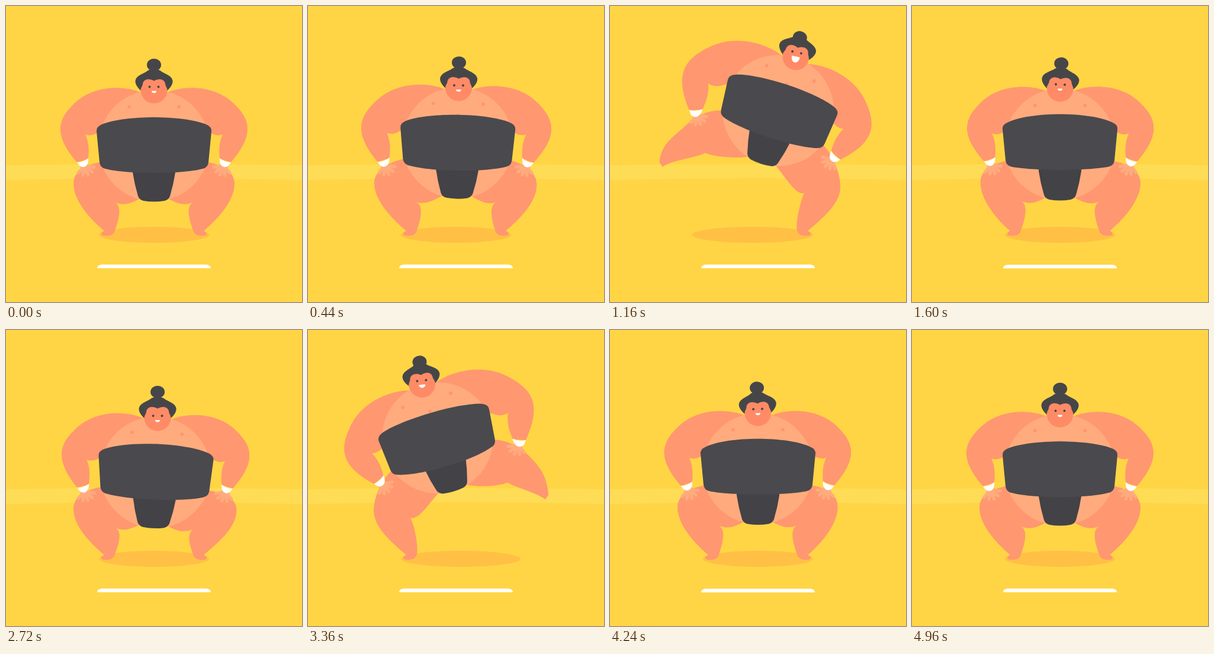
Write an HTML page with a canvas that moves like this. It is 500x500 px and loops after 5 s.

```html
<!DOCTYPE html>
<html lang="en">
<head>
<meta charset="utf-8">
<title>Sumo stomp</title>
<style>
html, body { margin: 0; width: 100%; height: 100%; overflow: hidden; background: #ffd545; }
canvas { display: block; width: 500px; height: 500px; }
</style>
</head>
<body>
<canvas id="stage" width="500" height="500"></canvas>
<script>
const ctx = document.getElementById('stage').getContext('2d');
const SKIN = '#ff9770', BELLY = '#ffab7d', FACE = '#ff8b66';
const BELT = '#4a494d', CLOTH = '#434246', HAIR = '#464649';
const LOOP = 5000, HALF = 2600, STEP = 40, LANDING = 1260;

const ramp = (t, from, to) => Math.min(1, Math.max(0, (t - from) / (to - from)));
const smooth = (t, from, to) => {
  const u = ramp(t, from, to);
  return u * u * (3 - 2 * u);
};
// Damped swing that starts when the foot hits the ground.
const wobble = (t, period, decay) => {
  const age = Math.max(0, t - LANDING);
  return Math.exp(-age / decay) * Math.sin(2 * Math.PI * age / period);
};

// All motion follows from a crouch, a lean, a foot lift, a grin and a sway.
function pose(t) {
  const drop = 1 - ramp(t, 1080, LANDING) ** 2;
  const dip = smooth(t, 0, 240) - smooth(t, 240, 560);
  const squat = dip + 2 * wobble(t, 480, 160);
  const lean = smooth(t, 300, 1000) * drop;
  const lift = (1 - (1 - ramp(t, 560, 1000)) ** 2) * drop;
  const grin = smooth(t, 300, 1200) - smooth(t, LANDING, 1460);
  const sway = wobble(t, 480, 260);
  return { dip, squat, lean, lift, grin, sway, kick: 23 * wobble(t, 320, 80) };
}

const rad = deg => deg * Math.PI / 180;
function turn(x, y, a) {
  const c = Math.cos(a), s = Math.sin(a);
  return [x * c - y * s, x * s + y * c];
}
function shape(path, color) {
  ctx.fillStyle = color;
  ctx.fill(new Path2D(path));
}
function oval(x, y, rx, ry, color, end = 2 * Math.PI) {
  ctx.fillStyle = color;
  ctx.beginPath();
  ctx.ellipse(x, y, rx, ry, 0, 0, end);
  ctx.fill();
}
function group(draw) {
  ctx.save();
  draw();
  ctx.restore();
}
function flip() {
  ctx.translate(500, 0);
  ctx.scale(-1, 1);
}
function onBody(body, x, y) {
  const [px, py] = turn(x, y, body.a);
  return [body.x + px, body.y + py];
}

// Knee, inner knee and ankle are points; straight and twist run from 0 to 1.
function leg(body, { knee: [kx, ky], inner: [ix, iy], ankle: [ax, ay], straight, twist }) {
  const hip = (x, y) => onBody(body, x, y);
  const foot = (x, y) => {
    const [px, py] = turn(x, y, rad(56 * twist));
    return [ax + px, ay + py];
  };
  const [bx, by] = turn(0, 28, rad(45 * twist));
  const q = 1 - twist, w = 10 + 8 * q;
  shape(`M${hip(0, 50)} L${hip(-70, 26)}
    C${hip(-98, 26)} ${kx - bx} ${ky - by} ${kx} ${ky}
    C${kx + bx} ${ky + by} ${foot(-26, -22)} ${ax} ${ay}
    C${foot(-6 * q, 2 * q)} ${foot(-7 * q, 8 * q)} ${foot(0, 8 * q)}
    C${foot(10, 9 * q)} ${foot(w - 2, 6 * q)} ${foot(w, -q)}
    C${foot(w + 6 - 8 * straight, -q - 17)} ${ix + 16 - 29 * straight} ${iy + 5 + 3 * straight} ${ix} ${iy}
    C${ix + 14} ${iy + 6} ${hip(-43, 100)} ${hip(-25, 90)}Z`, SKIN);
}

function arm(body, dx, dy, handTurn) {
  const [sx, sy] = onBody(body, -22, -91);
  const wx = 130 + dx, wy = 264 + dy;
  const rest = Math.atan2(119, -98), angle = Math.atan2(wy - sy, wx - sx);
  const stretch = Math.hypot(wx - sx, wy - sy) / Math.hypot(98, 119);

  group(() => {
    ctx.translate(wx, wy);
    ctx.rotate((angle - rest) * handTurn);
    ctx.strokeStyle = BELLY;
    ctx.lineCap = 'round';
    ctx.lineWidth = 5.5;
    ctx.beginPath();
    for (let i = 0; i < 5; i++) {
      const [x, y] = turn(16, 0, rad(132 - 31 * i));
      ctx.moveTo(3, 6);
      ctx.lineTo(3 + x, 6 + y);
    }
    ctx.stroke();
    oval(3, 8, 8, 6, BELLY);
  });
  group(() => {
    ctx.translate(sx, sy);
    ctx.rotate(angle);
    ctx.scale(stretch, Math.sqrt(stretch));
    ctx.rotate(-rest);
    ctx.translate(-228, -145);
    shape(`M228 146C200 134 145 132 112 168C86 194 82 220 120 264L139 258
      C141 240 139 228 134 217C142 220 150 218 158 212L200 200L235 160Z`, SKIN);
    shape('M120 264Q131 264 139 257C140 266 136 272 130 272C125 272 122 267 120 264Z', '#fff');
  });
}

function torso(pitch) {
  oval(0, 0, 94, 94, BELLY);
  for (const x of [-42, 42]) oval(x, -66, 3, 3, SKIN);
  oval(0, -46.5, 3, 3, SKIN);
  shape(`M-36 40L-36 45Q-33 65 -27 85Q-25 91 -18 93Q0 96 18 93
    Q25 91 27 85Q33 65 36 45L36 40Z`, CLOTH);
  ctx.translate(0, pitch / 2);
  const top = -52 + pitch * 0.8, low = 48.5 + pitch * 0.8;
  shape(`M-97 -24Q-98 -32 -88 -36C-50 ${top} 50 ${top} 88 -36Q98 -32 97 -24
    L92 28Q91 37 82 39C45 ${low} -45 ${low} -82 39Q-91 37 -92 28Z`, BELT);
}

function head({ squat, grin, sway }) {
  const look = 8 * squat - 3.5 * grin * grin;
  ctx.translate(grin, look * 0.4);
  ctx.rotate(rad(12 * grin - 11 * sway));
  oval(0, -45.5 + 9 * grin - 2 * squat, 12, 10.5, HAIR);
  shape(`M-21 -1C-28 -7 -32 -13 -31.5 -19C-30 -27 -20 -30 -13 -34C-7 -40 7 -40 13 -34
    C20 -30 30 -27 31.5 -19C32 -13 28 -7 21 -1Z`, HAIR);
  shape(`M-22.5 -3C-22 -8 -19 -10 -19 -14C-17 -22 -8 -23 0 -18.5C8 -23 17 -22 19 -14
    C19 -10 22 -8 22.5 -3A22.5 22.5 0 0 1 -22.5 -3Z`, FACE);
  ctx.translate(0, look * 0.6);
  for (const x of [-7.5, 7.5]) oval(x, -8.5, 2, 2, HAIR);
  oval(0, -1.5, 4 + 3 * grin, 3.5 + 7 * grin * grin, '#fff', Math.PI);
}

function wrestler(p) {
  const { dip, squat, lean, lift, grin, sway } = p;
  const body = {
    x: 250 + 42.5 * lean - 5 * dip,
    y: 236 - 74 * lean + 9 * squat,
    a: rad(22.5 * lean - 4.5 * dip)
  };
  const mirrored = { x: 500 - body.x, y: body.y, a: -body.a };
  const kneeX = 20 * lift - 7 * squat, kneeY = 9 * squat - 90 * lift - 35 * lean;
  const twist = Math.min(1, 1.43 * lift);

  leg(body, {
    knee: [114 + kneeX, 300 + kneeY],
    inner: [182 - 27 * lift - 3 * squat, 331 - 70 * lift - 33 * lean + 9 * squat],
    ankle: [166 - 103 * lift, 380 - 145 * lift],
    straight: twist, twist
  });
  arm(body, kneeX * 0.9, kneeY * 0.85, 0);
  group(() => {
    flip();
    leg(mirrored, {
      knee: [114 - 4 * lean, 300 + 7 * lean + 4 * squat],
      inner: [182 - 13 * lean + squat, 331 - 19 * lean + 5 * squat],
      ankle: [166, 380],
      straight: lean / 2, twist: 0
    });
    arm(mirrored, squat - 12 * lean, 5 * squat - 11 * lean, 1);
  });
  group(() => {
    ctx.translate(body.x, body.y);
    ctx.rotate(body.a);
    torso(6.8 * lean - 3.7 * grin * grin + 11 * sway);
  });
  group(() => {
    ctx.translate(...onBody(body, 0, -91));
    head(p);
  });
}

function frame(now) {
  const time = Math.floor(now % LOOP / STEP) * STEP;
  const p = pose(time % HALF);
  ctx.fillStyle = '#ffd545';
  ctx.fillRect(0, 0, 500, 500);
  shape('M0 269Q250 265 500 269V294Q250 288 0 294Z', '#ffdc55');
  group(() => {
    if (time >= HALF) flip();
    const grow = 11.5 * p.lift;
    oval(250 - grow, 386.5, 93 + grow, 13.5, '#ffc045');
    group(() => {
      ctx.translate(0, p.kick);
      shape('M154 443C154 439 158 436.8 163 436.8H337C342 436.8 346 439 346 443Z', '#fff');
    });
    wrestler(p);
  });
  requestAnimationFrame(() => frame(performance.now() - start));
}
const start = performance.now();
frame(0);
</script>
</body>
</html>
```
